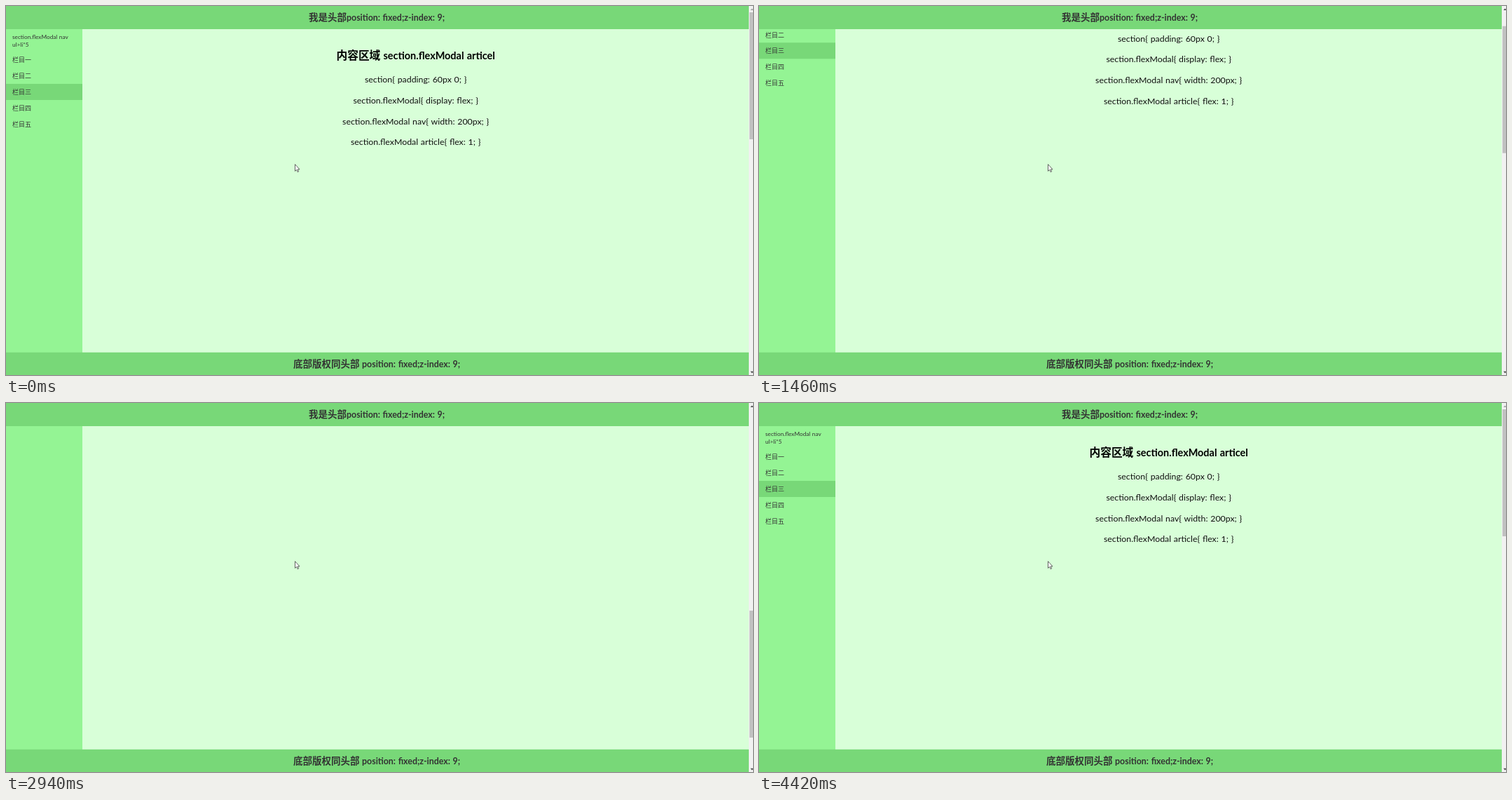
An HTML page that plays this animation: 1066x526 px, repeating every 4810 ms.

```html
<!DOCTYPE html>
<html lang="zh-CN">
<head>
<meta charset="utf-8">
<title>Flex layout</title>
<style>
  html, body { margin: 0; width: 100%; height: 100%; overflow: hidden; background: #d8ffd8; }
  svg { display: block; width: 1066px; height: 526px; }
  text { font-family: Lato, "Noto Sans CJK SC", "Noto Sans CJK", sans-serif; fill: #333; white-space: pre; }
  .mid { text-anchor: middle; }
  .bar { font-size: 12.4px; font-weight: 700; word-spacing: .6px; }
  .bar tspan { font-size: 13.5px; }
  .title { font-size: 14.45px; font-weight: 700; fill: #000; word-spacing: .7px; }
  .title tspan { font-size: 15.7px; }
  .line { font-size: 12.35px; fill: #111; word-spacing: .6px; }
  .note { font-size: 8.25px; word-spacing: .4px; }
  .item { font-size: 9px; }
  .green { fill: #78d878; }
</style>
</head>
<body>
<svg viewBox="0 0 1066 526">
  <rect width="1066" height="526" fill="#d8ffd8"/>
  <rect y="33" width="109" height="461" fill="#94f494"/>

  <g id="page">
    <rect class="green" y="111" width="109" height="23"/>
    <text class="mid title" x="584.7" y="76.4"><tspan>内容区域</tspan> section.flexModal articel</text>
  </g>

  <rect class="green" width="1060" height="33"/>
  <text class="mid bar" x="529" y="20.8"><tspan>我是头部</tspan>position: fixed;z-index: 9;</text>
  <rect class="green" y="493.8" width="1060" height="32.2"/>
  <text class="mid bar" x="529" y="515.3"><tspan>底部版权同头部</tspan> position: fixed;z-index: 9;</text>

  <rect x="1060" width="6" height="526" fill="#f1f1f1"/>
  <path id="up" d="M1062.3 6 L1064.6 3.4 L1067 6Z"/>
  <path d="M1062.3 520.8 L1064.6 523.4 L1067 520.8Z" fill="#505050"/>
  <rect id="thumb" x="1061" y="9" width="5" height="181" fill="#c1c1c1"/>

  <path d="M412.5 225.7 V235.4 L414.7 233.4 L416.2 236.7 L417.6 236 L416.2 232.9 H419Z"
        fill="#fff" stroke="#333" stroke-width=".75" stroke-linejoin="round"/>
</svg>
<script>
  const LOOP = 4810, PAGE_STEP = 57, THUMB_STEP = 19.13;
  const GLIDE = 208, LEAD = 23, TICK = 78;
  // wheel bursts: start and length in ms, clicks (negative is up)
  const bursts = [
    [1070, 240, 1], [1460, 460, 4], [2000, 240, 2], [2710, 230, 8],
    [3400, 240, -6], [3800, 150, -6], [4260, 160, -3]
  ];
  const [page, thumb, up] = ['page', 'thumb', 'up'].map(id => document.getElementById(id));

  function addRows(rows, cls, x, y, pitch) {
    rows.forEach((row, i) => {
      const text = document.createElementNS('http://www.w3.org/2000/svg', 'text');
      text.setAttribute('class', cls);
      text.setAttribute('x', x);
      text.setAttribute('y', y + i * pitch);
      text.textContent = row;
      page.append(text);
    });
  }
  addRows(['section.flexModal nav', 'ul>li*5'], 'note', 9, 46.9, 10.6);
  addRows([...'一二三四五'].map(n => '栏目' + n), 'item', 9, 80.3, 22.95);
  addRows([
    'section{ padding: 60px 0; }',
    'section.flexModal{ display: flex; }',
    'section.flexModal nav{ width: 200px; }',
    'section.flexModal article{ flex: 1; }'
  ], 'mid line', 584.7, 109.3, 29.65);

  const ease = x => (1 - Math.cos(Math.PI * Math.min(1, Math.max(0, x)))) / 2;

  // Each click glides on its own; the picture refreshes about every TICK ms.
  function scrolled(t, [start, length, clicks]) {
    if (t < start) return 0;
    const tick = length / Math.round(length / TICK);
    const now = Math.min(length, Math.floor((t - start + 1) / tick) * tick) + LEAD;
    const glide = Math.min(GLIDE, length + LEAD);
    const count = Math.abs(clicks);
    const gap = count > 1 ? (length + LEAD - glide) / (count - 1) : 0;
    let sum = 0;
    for (let i = 0; i < count; i++) sum += ease((now - i * gap) / glide);
    return sum * Math.sign(clicks);
  }

  function draw(t) {
    const clicks = bursts.reduce((sum, burst) => sum + scrolled(t, burst), 0);
    page.setAttribute('transform', `translate(0 ${-clicks * PAGE_STEP})`);
    thumb.setAttribute('y', 9 + clicks * THUMB_STEP);
    up.setAttribute('fill', clicks > .001 ? '#505050' : '#a3a3a3');
  }

  let start;
  function frame(now) {
    start ??= now;
    draw((now - start) % LOOP);
    requestAnimationFrame(frame);
  }
  draw(0);
  requestAnimationFrame(frame);
</script>
</body>
</html>
```
